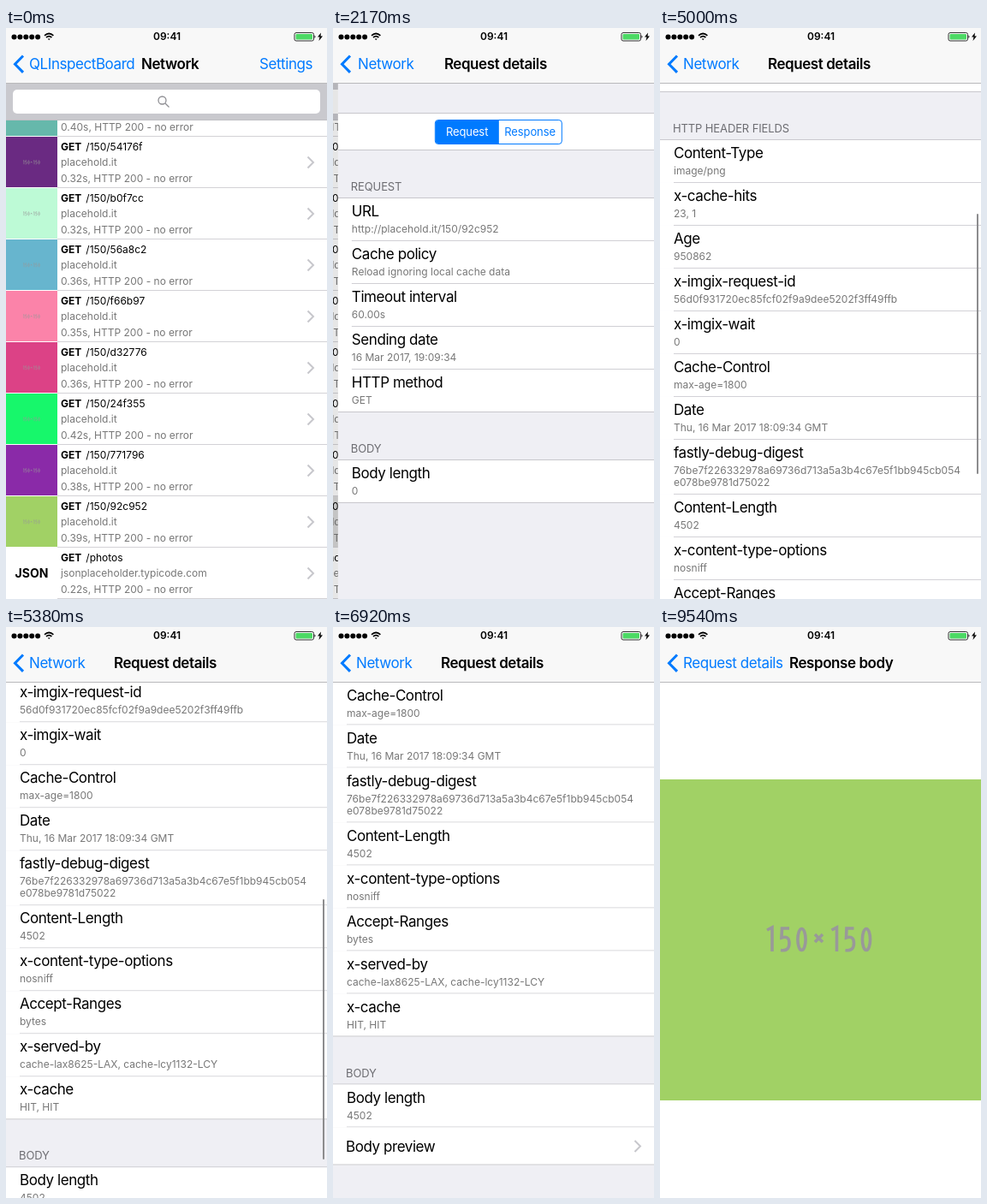
Write an HTML page that moves like this. It is 375x667 px and loops after 9.71 s.

```html
<!DOCTYPE html>
<html lang="en">
<head>
<meta charset="utf-8">
<title>Network inspector</title>
<style>
html, body { margin: 0; width: 100%; height: 100%; overflow: hidden; }
* { box-sizing: border-box; }
#stage { position: relative; width: 375px; height: 667px; overflow: hidden; background: #fff;
  font: 12px/14px Inter, sans-serif; color: #000; white-space: nowrap; }
#stage svg { fill: none; }
.page, .abs { position: absolute; }
.page { top: 0; left: 0; width: 375px; height: 667px; overflow: hidden; background: #fff; }
.shade { position: absolute; inset: 0; background: #000; }
.chevron { position: absolute; left: 351px; width: 10px; height: 16px; stroke: #c7c7cc; stroke-width: 2; }

/* request list */
.call { position: absolute; left: 0; width: 375px; height: 60px; color: #777; }
.call::after { content: ""; position: absolute; left: 60px; right: 0; bottom: 0; height: 1px; background: #d3d2d6; }
.call div { position: absolute; left: 64px; }
.call .path { color: #000; top: 5px; }
.call b { margin-right: 5px; }
.call .thumb { left: 0; width: 60px; height: 59.5px; font: 700 14px/60px Inter, sans-serif; text-align: center; color: #000; }
.call .chevron { top: 22px; }
#search { top: 64px; width: 375px; height: 44px; background: #c9c9ce; border-bottom: 1px solid #bfbfc4; }
#search div { position: absolute; left: 8px; top: 8px; width: 359px; height: 28px; border-radius: 5px; background: #fff; }
#search svg { position: absolute; left: 177px; top: 15px; stroke: #8e8e93; stroke-width: 1.3; }

/* details */
#details { background: #efeff4; }
.content { position: absolute; top: 64px; width: 375px; padding-top: 35px; }
.switch { height: 43.5px; background: #fff; border: solid #c8c7cc; border-width: 1px 0; }
.switch div { position: absolute; left: 113px; top: 43px; width: 149px; height: 29px; display: flex; overflow: hidden;
  border: 1px solid #007aff; border-radius: 4px; font-size: 13px; line-height: 27px; letter-spacing: -.1px; }
.switch span { flex: 1; text-align: center; color: #007aff; }
.switch .on { background: #007aff; color: #fff; }
.switch .pressed { background: #d9ebff; }
.group { height: 56px; padding: 35px 0 0 15px; border-bottom: 1px solid #c8c7cc; font-size: 13px; letter-spacing: -.12px; color: #6d6d72; }
.field { position: relative; padding: 5px 0 6.5px 16px; background: #fff; color: #777; }
.field::after { content: ""; position: absolute; left: 16px; right: 0; bottom: 0; height: 1px; background: #d0cfd4; }
.field.last::after { left: 0; background: #c8c7cc; }
.field p { margin: 0 0 4.5px; font-size: 17px; line-height: 20px; letter-spacing: -.43px; color: #000; }
.field.link { height: 44px; padding: 12px 0 0 15px; }
.field .chevron { top: 14px; }
#thumb { left: 369.5px; width: 2.5px; height: 304px; border-radius: 2px; background: #8c8c8e; }

/* bars */
#nav { inset: 0 0 auto; height: 65px; background: #f8f8f8; border-bottom: 1px solid #b9b9bc; }
#nav .item { position: absolute; left: 0; top: 32px; font-size: 17px; line-height: 20px; letter-spacing: -.43px; }
#nav .back { color: #007aff; }
#nav .title { font-weight: 600; }
#clock { left: 172px; top: 3px; font-weight: 600; }
</style>
</head>
<body>
<div id="stage">
  <svg width="0" height="0" class="abs">
    <symbol id="size" viewBox="0 0 375 375">
      <g id="number" stroke="#999" stroke-width="3.6">
        <path d="M125 176l6-3v28M151 174h-8.500l-.5 11q9-3 9 6.500t-10 8"/>
        <ellipse cx="165.500" cy="187" rx="4.600" ry="12.500"/>
      </g>
      <use href="#number" x="75.500"/>
      <path d="M181 181l9 9m0-9l-9 9" stroke="#999" stroke-width="3.600"/>
    </symbol>
    <symbol id="arrow" viewBox="0 0 10 16"><path d="M1.500 1.500L8 8l-6.500 6.500"/></symbol>
  </svg>

  <div class="page" id="list">
    <div class="abs" id="search"><div></div>
      <svg width="14" height="14"><circle cx="5.500" cy="5.500" r="4.500"/><path d="M9 9l4.500 4.500"/></svg>
    </div>
  </div>
  <div class="page" id="details">
    <div class="content" id="request"></div>
    <div class="content" id="response"></div>
    <div class="abs" id="thumb"></div>
  </div>
  <div class="page" id="body">
    <svg class="abs" id="picture" style="top:178px" width="375" height="375">
      <rect width="375" height="375" fill="#a1d165"/><use href="#size"/>
    </svg>
  </div>

  <div class="abs" id="nav">
    <svg class="abs" width="375" height="64">
      <g id="dots" fill="#000"></g>
      <g stroke="#000" stroke-width="1.700">
        <path d="M45 8.800q5.200-4.600 10.400 0M47 11q3.200-2.700 6.400 0"/>
        <path d="M48.700 12.400h3l-1.500 1.800z" fill="#000" stroke="none"/>
      </g>
      <rect x="337" y="5.500" width="22.500" height="9.500" rx="2" stroke="#333"/>
      <rect x="338.500" y="7" width="19.500" height="6.500" rx="1" fill="#4cd964"/>
      <path d="M360.500 8.500q2 1.700 0 3.500zM368 5.500l-4 5h2.500l-1 4.500 4.500-5.500h-2.500z" fill="#000"/>
      <path d="M20 32.500l-9.500 9.700 9.500 9.700" stroke="#007aff" stroke-width="3"/>
    </svg>
    <div class="abs" id="clock">09:41</div>
  </div>
</div>

<script>
const $ = id => document.getElementById(id);
const add = (parent, html) => {
  parent.insertAdjacentHTML("beforeend", html);
  return parent.lastElementChild;
};
const chevron = '<svg class="chevron"><use href="#arrow"/></svg>';

// Request list
const calls = [
  ["1ee8a4", "#66b8ab", "0.40"], ["54176f", "#6a2a82", "0.32"], ["b0f7cc", "#bdfad6", "0.32"],
  ["56a8c2", "#67b5ce", "0.36"], ["f66b97", "#fb83a9", "0.35"], ["d32776", "#dc4286", "0.36"],
  ["24f355", "#17f76b", "0.42"], ["771796", "#8a2aa8", "0.38"], ["92c952", "#a1d165", "0.39"]
];
const addCall = (i, path, host, seconds, thumb) => {
  const row = add($("list"), `<div class="call" style="top:${66.7 + 60 * i}px">${thumb}
    <div class="path"><b>GET</b>${path}</div><div style="top:23px">${host}</div>
    <div style="top:42px">${seconds}s, HTTP 200 - no error</div>${chevron}</div>`);
  $("list").insertBefore(row, $("search"));
  return row;
};
const callRows = calls.map(([hex, color, seconds], i) =>
  addCall(i, "/150/" + hex, "placehold.it", seconds,
    `<div class="thumb" style="background:${color}"><svg width="60" height="60"><use href="#size"/></svg></div>`));
addCall(9, "/photos", "jsonplaceholder.typicode.com", "0.22", '<div class="thumb">JSON</div>');

// Details: alternating section titles and [name, value] lists
const addSections = (page, active, ...sections) => {
  add(page, `<div class="switch"><div>${["Request", "Response"].map(s =>
    `<span class="${s === active ? "on" : ""}">${s}</span>`).join("")}</div></div>`);
  for (const [title, fields] of sections) {
    add(page, `<div class="group">${title}</div>`);
    fields.forEach(([name, value], i) => add(page,
      `<div class="field ${i === fields.length - 1 ? "last" : ""} ${value ? "" : "link"}"><p>${name}</p>${value || chevron}</div>`));
  }
};
addSections($("request"), "Request",
  ["REQUEST", [
    ["URL", "http://placehold.it/150/92c952"],
    ["Cache policy", "Reload ignoring local cache data"],
    ["Timeout interval", "60.00s"],
    ["Sending date", "16 Mar 2017, 19:09:34"],
    ["HTTP method", "GET"]]],
  ["BODY", [["Body length", "0"]]]);
addSections($("response"), "Response",
  ["RESPONSE", [
    ["Receiving date", "16 Mar 2017, 19:09:34"],
    ["Duration", "0.39s"],
    ["HTTP status code", "200 - no error"]]],
  ["HTTP HEADER FIELDS", [
    ["Content-Type", "image/png"],
    ["x-cache-hits", "23, 1"],
    ["Age", "950862"],
    ["x-imgix-request-id", "56d0f931720ec85fcf02f9a9dee5202f3ff49ffb"],
    ["x-imgix-wait", "0"],
    ["Cache-Control", "max-age=1800"],
    ["Date", "Thu, 16 Mar 2017 18:09:34 GMT"],
    ["fastly-debug-digest", "76be7f226332978a69736d713a5a3b4c67e5f1bb945cb054<br>e078be9781d75022"],
    ["Content-Length", "4502"],
    ["x-content-type-options", "nosniff"],
    ["Accept-Ranges", "bytes"],
    ["x-served-by", "cache-lax8625-LAX, cache-lcy1132-LCY"],
    ["x-cache", "HIT, HIT"]]],
  ["BODY", [["Body length", "4502"], ["Body preview", ""]]]);
const responseTab = $("request").querySelector(".switch span:last-child");
const previewRow = $("response").lastElementChild;

// Navigation bar
for (let i = 0; i < 5; i++) add($("dots"), `<circle cx="${9.5 + 6.9 * i}" cy="10.5" r="3"/>`);
const addItem = (kind, text) => add($("nav"), `<div class="item ${kind}">${text}</div>`);
const bars = [
  ["QLInspectBoard", "Network", 158],
  ["Network", "Request details", 126],
  ["Request details", "Response body", 151]
].map(([back, title, x]) => ({ back: addItem("back", back), title: addItem("title", title), x }));
const settings = addItem("back", "Settings");
const shades = [$("list"), $("details")].map(page => add(page, '<div class="shade"></div>'));

const LOOP = 9710, PUSHES = [1903, 7312], SCROLL_START = 4460, SCROLL_END = 590.5;
const clamp = v => Math.max(0, Math.min(1, v));
const place = (el, x, alpha = 1) => {
  el.style.transform = `translateX(${x}px)`;
  el.style.opacity = alpha;
};
// Critically damped spring, 0 to 1
const spring = ms => {
  const k = Math.max(0, ms) * 0.02286;
  return 1 - (1 + k) * Math.exp(-k);
};

function draw(t) {
  const [first, second] = PUSHES.map(start => spring(t - start));

  place($("list"), -112.5 * first);
  place($("details"), 375 * (1 - first) - 112.5 * second);
  place($("body"), 375 * (1 - second));
  shades[0].style.opacity = 0.1 * first;
  shades[1].style.opacity = 0.1 * second;
  callRows[8].style.background = t >= 1840 ? "#d9d9d9" : "";
  previewRow.style.background = t >= 7250 ? "#d9d9d9" : "";
  $("picture").style.opacity = clamp((t - PUSHES[1]) / 248);

  // Each bar enters from the right; its title then becomes the next back label
  const entered = [1, first, second, 0];
  bars.forEach(({ back, title, x }, i) => {
    const come = entered[i], leave = entered[i + 1];
    const from = i ? bars[i - 1].x : 27;
    const fadeIn = clamp(come * 1.6 - 0.5), fadeOut = clamp(1 - leave * 1.6);
    place(back, from + (27 - from) * come - 120 * leave, fadeIn * fadeOut);
    place(title, x + (375 - x) * (1 - come) + (27 - x) * leave, fadeIn * fadeOut);
  });
  place(settings, 296, clamp(1 - first * 1.6));

  const showResponse = t >= 3640;
  $("request").style.display = showResponse ? "none" : "";
  $("response").style.display = showResponse ? "" : "none";
  responseTab.className = t >= 3580 ? "pressed" : "";

  const elapsed = Math.max(0, t - SCROLL_START);
  const scrolled = 1 - Math.exp(-((elapsed / 685) ** 2));
  $("response").style.transform = `translateY(${-SCROLL_END * scrolled}px)`;
  $("thumb").style.top = 67 + 293 * scrolled ** 0.87 + "px";
  $("thumb").style.opacity = clamp(elapsed / 80) * clamp((6500 - t) / 250);
}

function tick() {
  draw(performance.now() % LOOP);
  requestAnimationFrame(tick);
}
tick();
</script>
</body>
</html>
```
